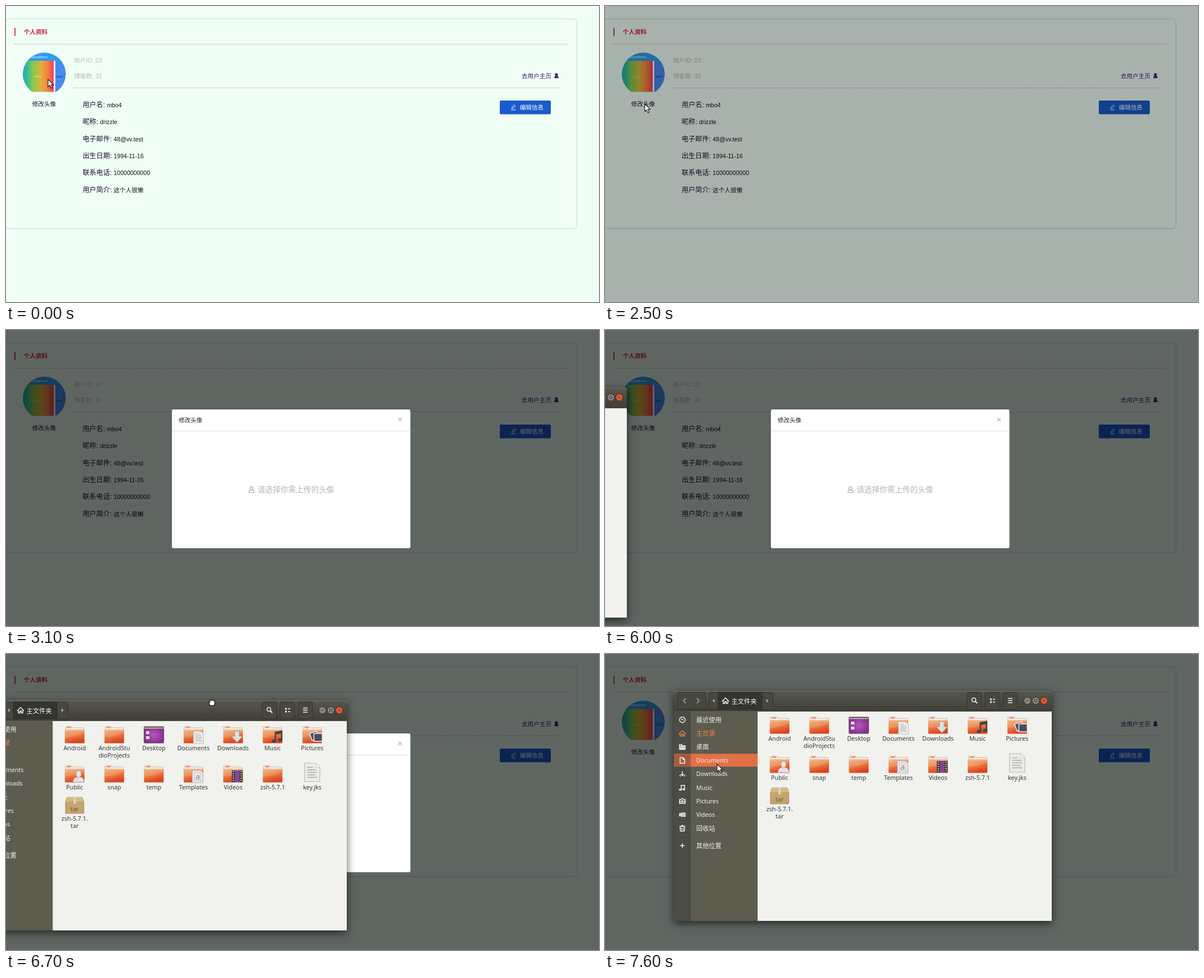
Recreate the animation shown at these times as an HTML page. Size 1058 by 529 pixels, loop 8 s.

```html
<!DOCTYPE html>
<html lang="zh-CN">
<head>
<meta charset="utf-8">
<title>个人资料</title>
<style>
html, body { margin: 0; width: 100%; height: 100%; overflow: hidden; background: #effff6; }
svg { display: block; width: 100vw; height: 100vh; }
text { font: 10.64px "Liberation Sans", "Noto Sans CJK SC", sans-serif; white-space: pre; }
.label { font-size: 12.16px; }
#files text { font: 10.7px "Noto Sans", "Noto Sans CJK SC", sans-serif; }
#files .cjk { font-size: 11.3px; }
#files { filter: drop-shadow(0 4px 8px rgba(0, 0, 0, .65)); }
.line { fill: none; stroke: #f2f1ec; stroke-width: 1.5; }
.mid { text-anchor: middle; }
</style>
</head>
<body>
<svg viewBox="0 0 1058 529">
  <defs>
    <linearGradient id="rainbow">
      <stop offset="0" stop-color="#25a9cf"/><stop offset=".12" stop-color="#32b89c"/>
      <stop offset=".32" stop-color="#82cb4c"/><stop offset=".58" stop-color="#e0b13c"/>
      <stop offset=".78" stop-color="#f7863e"/><stop offset="1" stop-color="#ef3b55"/>
    </linearGradient>
    <linearGradient id="bar" x2="0" y2="1">
      <stop stop-color="#59574c"/><stop offset="1" stop-color="#3f3e37"/>
    </linearGradient>
    <linearGradient id="front" x2=".35" y2="1">
      <stop stop-color="#eeae78"/><stop offset=".5" stop-color="#ea8045"/><stop offset="1" stop-color="#db431f"/>
    </linearGradient>
    <radialGradient id="purple">
      <stop stop-color="#b954b9"/><stop offset="1" stop-color="#85358f"/>
    </radialGradient>
    <clipPath id="round"><path d="M30 83H107V153.3H30Z"/></clipPath>
    <clipPath id="disc"><circle cx="68.3" cy="121.5" r="38.2"/></clipPath>
    <clipPath id="frame"><path d="M0 411V5Q0 0 5 0H669Q674 0 674 5V411Z"/></clipPath>
    <g id="folder">
      <path d="M-16.5 28V2Q-16.500 .5 -15 .5H-5L-3 3H15.500Q16.500 3 16.500 4V28Z" fill="#f6efe9" stroke="#cdb5a7"/>
      <path d="M-14 2.500H-6" stroke="#e2622e" stroke-width="1.500"/>
      <rect x="-17.500" y="6" width="35" height="24.500" rx="1.500" fill="url(#front)"/>
      <path d="M-17 7H17" stroke="#f6c9a4"/>
      <path d="M-17 20Q0 20 17 11V7H-17Z" fill="#fff" opacity=".13"/>
    </g>
    <g id="page">
      <path d="M-9 -11H4L9 -6V11H-9Z" fill="#ececea" stroke="#b9b9b5" stroke-width=".8"/>
      <path d="M4 -11V-6H9Z" fill="#fff" stroke="#b9b9b5" stroke-width=".5"/>
      <path d="M-6 -6H1M-6 -3H5M-6 0H6M-6 3H4M-6 6H6" stroke="#a6a6a3" stroke-width="1"/>
    </g>
    <g id="house"><path class="line" style="stroke:inherit" d="M-6 1L0 -5 6 1M-4 0V5H-1.300V1.500H1.300V5H4V0"/></g>
  </defs>

  <rect width="1058" height="529" fill="#effff6"/>
  <rect x="-1" y="23" width="1019.500" height="374.500" rx="6" fill="none" stroke="#c8d9e3" stroke-width="3" opacity=".35"/>
  <rect x="-1" y="23" width="1019.500" height="374.500" rx="6" fill="#effff6" stroke="#cddce6"/>
  <path d="M16 39V53.500" stroke="#cf1f40" stroke-width="1.700"/>
  <text x="31.700" y="50" font-weight="bold" style="font-weight:bold" fill="#d5183f">个人资料</text>
  <path d="M15 68.200H1003M121 146.200H988" stroke="#b7a3bb" stroke-dasharray="2.300 1.500"/>

  <g clip-path="url(#round)"><g clip-path="url(#disc)">
    <path d="M30 83H107V154H30Z" fill="#309ceb"/>
    <path d="M30 98H85.500V154H30Z" fill="url(#rainbow)"/>
    <path d="M85 98H88V154H85Z" fill="#f3f4fb"/>
    <path d="M88 98H107V154H88Z" fill="#478af1"/>
    <text x="43" y="93" fill="#fff" style="font-size:5.500px">LayoutDemo</text>
    <text x="51" y="128" fill="#f7d7a0" style="font-size:5.500px">text1</text>
    <text x="90" y="128" fill="#1d3768" style="font-size:5.500px">text2</text>
  </g></g>
  <text x="46.700" y="178.500" fill="#1b1230">修改头像</text>
  <g fill="#b7bfba"><text x="121.500" y="101">用户ID: 23</text><text x="121.500" y="128.500">博客数: 32</text></g>
  <g fill="#472379">
    <text x="920" y="128.500">去用户主页</text>
    <circle cx="982" cy="122.700" r="2.700"/>
    <path d="M980.500 124H983.500V125.500H985.500V129H978.500V125.500H980.500Z"/>
  </g>
  <g id="profile"></g>
  <rect x="881" y="169" width="91" height="24.500" rx="2" fill="#195bcd"/>
  <path d="M902.500 183L903 180.700 907 176.700 909 178.700 905 182.600ZM901 185.700H909.500" fill="none" stroke="#fff"/>
  <text x="916.700" y="185.300" fill="#fff">编辑信息</text>

  <rect id="mask" width="1058" height="529"/>
  <g id="modal">
    <rect x="296" y="142" width="425.500" height="248" rx="3" fill="#fefffe"/>
    <path d="M296 180.500H721.500" stroke="#dde1de"/>
    <text x="308" y="165.200" fill="#252525">修改头像</text>
    <path d="M700 157.200L706 163.200M706 157.200L700 163.200" stroke="#a3a6a4" stroke-width="1.100"/>
    <g fill="none" stroke="#b4b7b5" stroke-width="1.300">
      <circle cx="438" cy="282.700" r="2.700"/><path d="M433.500 290.300Q433.500 286 436.500 286H439.500Q442.500 286 442.500 290.300Z"/>
    </g>
    <text x="448.800" y="290" fill="#b4b7b5" style="font-size:13.680px">请选择你需上传的头像</text>
  </g>

  <g id="files"><g clip-path="url(#frame)">
    <rect width="674" height="411" fill="#f1f1ed"/>
    <rect width="674" height="36.500" fill="url(#bar)"/>
    <path d="M4 .7H670" stroke="#77756a"/>
    <path d="M0 36H674" stroke="#302f2a"/>
    <g fill="#48473f" stroke="#35342e">
      <rect x="6.500" y="2.500" width="50" height="30" rx="3"/>
      <rect x="62.500" y="2.500" width="114" height="30" rx="3"/>
      <rect x="523" y="2.500" width="26" height="30" rx="3"/>
      <rect x="555" y="2.500" width="26" height="30" rx="3"/>
      <rect x="587" y="2.500" width="26" height="30" rx="3"/>
    </g>
    <rect x="79" y="2.500" width="78" height="30" fill="#35352f" stroke="#2c2b27"/>
    <path class="line" style="stroke:#aaa89f" d="M21 13L17 17.500 21 22M41 13L45 17.500 41 22"/>
    <path d="M72.500 14V21L68.500 17.500ZM165 14V21L169 17.500Z" fill="#a9a79e"/>
    <use href="#house" x="92" y="17.500" stroke="#f2f1ec"/>
    <text class="cjk" x="102.500" y="22.500" fill="#fff" style="font-weight:500">主文件夹</text>
    <circle class="line" cx="535" cy="16" r="3.500"/><path class="line" style="stroke-width:2" d="M537.500 18.500L541 22"/>
    <path d="M564 13.500H567V16.500H564ZM564 18.500H567V21.500H564ZM569 14.200H573V15.800H569ZM569 19.200H573V20.800H569Z" fill="#f2f1ec"/>
    <path class="line" d="M596 13.500H604M596 17.300H604M596 21.100H604"/>
    <g stroke="#35342e"><circle cx="630.500" cy="17.500" r="6.300" fill="#89877d"/><circle cx="645.500" cy="17.500" r="6.300" fill="#89877d"/><circle cx="660.500" cy="17.500" r="6.300" fill="#ea5830"/></g>
    <path d="M628 17.500H633M643.500 15.500H647.500V19.500H643.500ZM658.500 15.500L662.500 19.500M662.500 15.500L658.500 19.500" fill="none" stroke="#403d36"/>
    <rect y="36.500" width="149.500" height="375" fill="#5d5d4f"/>
    <rect y="36.500" width="30" height="375" fill="#4b4c42"/>
    <g id="hover"><rect y="112.300" width="149.500" height="23" fill="#e37145"/><rect y="112.300" width="30" height="23" fill="#a35c42"/></g>
    <path d="M149.500 36.500V411" stroke="#c7c6bf"/>
    <g id="places"></g>
    <g id="grid"></g>
  </g></g>

  <path id="arrow" d="M0 0V13.500L3.200 10.700 5.500 15.700 7.800 14.700 5.600 9.700H9.700Z" fill="#fff" stroke="#111" stroke-width="1.100"/>
  <path id="hand" d="M-5 -1.500Q-6.500 0 -5 1.500L-3 5H4Q5.500 3 5.500 -1Q5.500 -3 4 -3Q3 -4.800 1.500 -4Q0 -5.500 -1.200 -4Q-3 -5 -3.300 -3V0Z" fill="#fff" stroke="#111" stroke-width="1.200"/>
</svg>
<script>
const $ = id => document.getElementById(id);

$("profile").innerHTML = [
  ["用户名", "mbo4"], ["昵称", "drizzle"], ["电子邮件", "48@vv.test"],
  ["出生日期", "1994-11-16"], ["联系电话", "10000000000"], ["用户简介", "这个人很懒"]
].map(([label, value], i) =>
  `<text class="label" x="136.700" y="${181 + 30.35 * i}" fill="#1b1230">${label}: <tspan font-size="10.640" fill="#121212">${value}</tspan></text>`
).join("");

// Sidebar icons are drawn around their own centre.
const places = [
  ["最近使用", "M-5 0A5 5 0 1 0 5 0A5 5 0 1 0 -5 0M-2 -2L0 0H2"],
  ["主目录", ""],
  ["桌面", "M-5 -4H-1V-2H5V4.500H-5ZM-5 -1H5M-4 1H4M-4 3H4"],
  ["Documents", "M-4 -5H1L4 -2V5H-4ZM1 -5V-2H4"],
  ["Downloads", "M0 -5V3M-3 0L0 3 3 0M-5 2L-3 4M5 2L3 4"],
  ["Music", "M-2 3V-4H4V2M-5 3H-2V4.500H-5ZM1 2H4V4H1Z"],
  ["Pictures", "M-5 -3H-2L-1 -4.500H1L2 -3H5V4H-5ZM-1.500 .5A1.500 1.500 0 1 0 1.500 .5A1.500 1.500 0 1 0 -1.500 .5M-4 -1V3M4 -1V3"],
  ["Videos", "M-2 -3H5V3H-2ZM-1 -1H4M-1 1H4M-2 0L-5 -2V2Z"],
  ["回收站", "M-5 -3.500H5M-2 -5H2M-4 -3L-3.500 5H3.500L4 -3M-1.500 -1V3M1.500 -1V3"],
  ["其他位置", "M-4 0H4M0 -4V4"]
];
$("places").innerHTML = places.map(([name, icon], i) => {
  const y = 51.5 + 24.25 * i + (i === 9 ? 6.7 : 0);
  const color = i === 1 ? "#f37c4b" : "#f2f1ec";
  const cjk = name.charCodeAt(0) > 255;
  return `<g transform="translate(15 ${y})" stroke="${color}">${icon ? `<path class="line" d="${icon}"/>` : '<use href="#house"/>'}</g>
    <text ${cjk ? 'class="cjk"' : ""} x="39.700" y="${y + (cjk ? 4.2 : 3.8)}" fill="${color}">${name}</text>`;
}).join("");

const emblems = {
  Documents: '<use href="#page" x="9" y="20"/>',
  Downloads: '<path d="M3 9H11V18H17L7 29 -3 18H3Z" fill="#dedfdd" stroke="#999b98" stroke-width=".8"/>',
  Music: '<path d="M5 26V11L16 9V24" fill="none" stroke="#444" stroke-width="2.500"/><path d="M5 13L16 11" stroke="#444" stroke-width="4"/><ellipse cx="2.500" cy="26.500" rx="4" ry="3" fill="#444"/><ellipse cx="13.500" cy="24.500" rx="4" ry="3" fill="#444"/>',
  Pictures: '<g stroke="#f4f4f4" stroke-width="1.500" fill="#4b4b60"><rect x="-3" y="11" width="13" height="13" transform="rotate(-20 3 17)"/><rect x="3" y="13" width="15" height="14"/></g>',
  Public: '<g fill="#e4e3e1" stroke="#aaa6a2" stroke-width=".8"><path d="M-3 30Q-3 22 4 21H10Q17 22 17 30Z"/><ellipse cx="7" cy="15.500" rx="4.500" ry="6"/></g>',
  Templates: '<path d="M-2 9H13L17 13V31H-2Z" fill="#e9e9e7" stroke="#b0b0ac"/><path d="M1 13H14M1 27H14M2 12V29M13 12V29" stroke="#bbb" stroke-width=".7"/><text class="mid" x="7.500" y="25" fill="#888" style="font-size:15px">a</text>',
  Videos: '<rect x="-2" y="9" width="19" height="21" fill="#383238"/><rect x="3" y="9" width="9" height="21" fill="#81478c"/><path d="M.5 10V30M14.500 10V30" stroke="#ddd" stroke-width="2" stroke-dasharray="2 2"/>'
};
const whole = {
  Desktop: '<rect x="-17.500" y="1" width="35" height="29" rx="1.500" fill="url(#purple)" stroke="#5f2968"/><path d="M-17.500 1.500H17.500" stroke="#756f43" stroke-width="2"/><path d="M-17 3.500H17" stroke="#eee"/><path d="M-14 9H-8V14H-14ZM-14 18H-8V23H-14Z" fill="#f2dff0"/>',
  "key.jks": '<use href="#page" transform="translate(0 12.500) scale(1.500)"/>',
  "zsh-5.7.1.tar": '<path d="M-13.500 1H13.500L16.500 9V30H-16.500V9Z" fill="#c4a36e" stroke="#a18455" stroke-width=".7"/><path d="M-16.500 9H16.500L13.500 1H-13.500Z" fill="#d5b985"/><path d="M-2 1H2V13H-2Z" fill="#e6d4af"/><text class="mid" x="0" y="26" fill="#6c552f">tar</text>'
};
const files = ["Android", "AndroidStu|dioProjects", "Desktop", "Documents", "Downloads", "Music", "Pictures",
  "Public", "snap", "temp", "Templates", "Videos", "zsh-5.7.1", "key.jks", "zsh-5.7.1.|tar"];
$("grid").innerHTML = files.map((name, i) => {
  const key = name.replace("|", "");
  const icon = whole[key] || '<use href="#folder"/>' + (emblems[key] || "");
  const label = name.split("|").map((line, n) =>
    `<text class="mid" y="${42.8 + 12.8 * n}" fill="#353535">${line}</text>`).join("");
  return `<g transform="translate(${188.5 + 70.65 * (i % 7)} ${46 + [0, 70, 126][Math.floor(i / 7)]})">${icon}${label}</g>`;
}).join("");

// Keys are [time, ...values], joined by straight lines and held at both ends.
function along(keys, t) {
  const next = keys.findIndex(key => key[0] > t);
  if (next === 0) return keys[0].slice(1);
  if (next < 0) return keys[keys.length - 1].slice(1);
  const a = keys[next - 1], b = keys[next], k = (t - a[0]) / (b[0] - a[0]);
  return a.slice(1).map((v, i) => v + (b[i + 1] - v) * k);
}
const pointerPath = [[400, 75, 131], [600, 82, 139], [1200, 82, 139], [1300, 84, 168], [1400, 80, 182],
  [1700, 80, 182], [1800, 78, 181], [2300, 71, 175], [2900, 71, 175], [3000, 34, 172],
  [7300, 262, 161], [7500, 262, 161], [7600, 200, 197]];
const windowPath = [[6000, -635, 103], [6200, -514, 102], [6300, -514, 102], [6400, -430, 100],
  [6600, -190, 90], [6700, -66, 83], [6800, 27, 71], [6900, 85, 67], [7000, 110, 66], [7200, 123, 66]];
const maskFade = [[2400, 0], [2500, .3], [2600, .6]];
const modalZoom = [[2500, 0], [2600, .41], [2700, .95], [2800, 1]];

const show = (id, on) => $(id).style.display = on ? "" : "none";
const move = (id, x, y) => $(id).setAttribute("transform", `translate(${x} ${y})`);

function draw(now) {
  const t = Math.floor(now % 8000 / 100) * 100;
  $("mask").setAttribute("opacity", along(maskFade, t)[0]);

  const zoom = along(modalZoom, t)[0];
  $("modal").setAttribute("opacity", zoom);
  $("modal").setAttribute("transform", `translate(71 175.5) scale(${.2 + .8 * zoom}) translate(-71 -175.5)`);

  show("files", t >= 6000);
  move("files", ...along(windowPath, t));
  show("hover", t >= 7300);

  show("arrow", t < 3100 || t >= 7300);
  move("arrow", ...along(pointerPath, t));

  // The dragged window trails the hand by one step.
  const [x, y] = along(windowPath, t + 100);
  show("hand", t >= 6400 && t < 7300);
  move("hand", x + 340, y + 16);
}
const start = performance.now();
(function tick() {
  draw(performance.now() - start);
  requestAnimationFrame(tick);
})();
</script>
</body>
</html>
```
